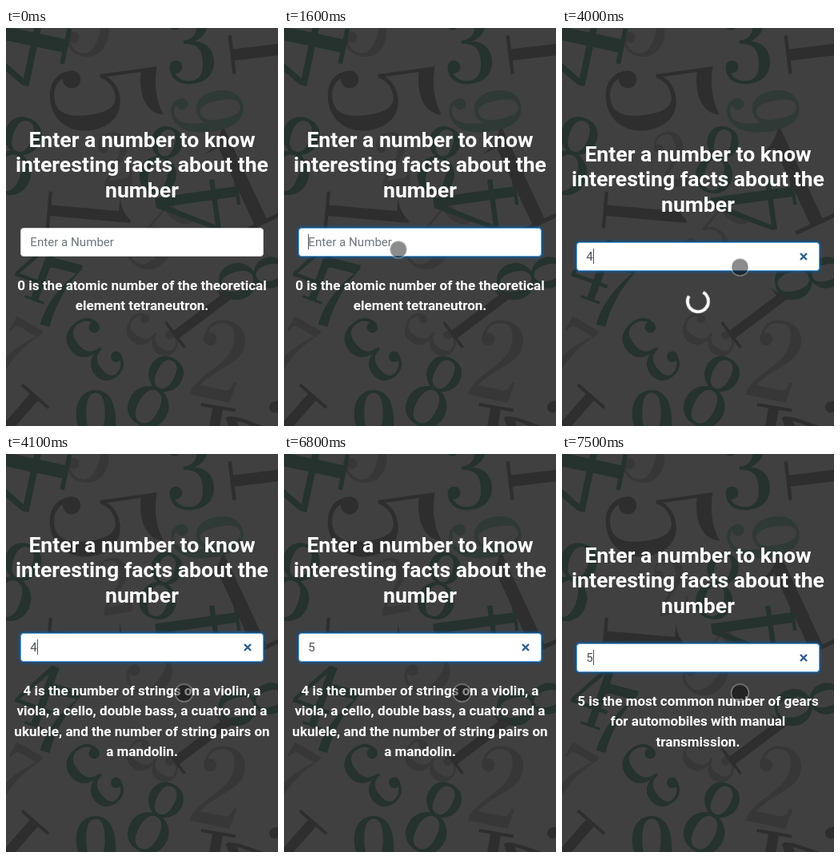
An HTML page that plays this animation: 340 px wide and 498 px high, repeating every 8000 ms.

```html
<!DOCTYPE html>
<html lang="en">
<head>
<meta charset="utf-8">
<title>Number facts</title>
<style>
  html, body { margin: 0; width: 100%; height: 100%; overflow: hidden; background: #404040; }
  #stage {
    position: relative; width: 340px; height: 498px; overflow: hidden;
    font-family: Roboto, sans-serif; color: #fff; text-align: center; white-space: nowrap;
  }
  #stage * { box-sizing: border-box; }
  #stage div, #stage svg { position: absolute; }

  #digits { inset: 0; fill-rule: evenodd; }
  .dark { fill: #2d2e2d; }
  .green { fill: #25322e; }
  .grey { fill: #373737; }
  .moss { fill: #2f3936; }

  .timed, .timed * { animation: 8s step-end infinite; }
  #panel { inset: 0; animation-name: shift; }
  #title { top: 124.5px; width: 340px; font-size: 26.64px; font-weight: 700; line-height: 31.6px; }
  .fact { top: 309.5px; width: 340px; font-size: 17.07px; font-weight: 700; line-height: 25.5px; }
  #zero { animation-name: zero; }
  #four { animation-name: four; }
  #five { animation-name: five; }

  #field {
    left: 18px; top: 250px; width: 304px; height: 36px; border: 1px solid #ced4da;
    border-radius: 4px; background: #fff; animation-name: focus;
    font-size: 15.11px; line-height: 34px; color: #495057; text-align: left;
  }
  #field div { left: 11.3px; }
  #hint { color: #6c757d; animation-name: hint; }
  #key4 { animation-name: key4; }
  #key5 { animation-name: key5; }
  #clear { left: 277.5px; top: 12px; animation-name: clear; }
  #field #caret { left: 11px; top: 7px; width: 1px; height: 19px; background: #555; animation-name: caret, caretX; }

  #spinner {
    left: 155px; top: 309px; width: 30px; height: 30px; border: 4px solid #fff;
    border-right-color: transparent; border-radius: 50%; animation-name: loading, spin;
  }
  #touch {
    left: -11.5px; top: -11.5px; width: 23px; height: 23px; border-radius: 50%;
    border: 1.5px solid rgba(255, 255, 255, .45); background: rgba(0, 0, 0, .45);
    background-clip: padding-box; animation-name: touch;
  }

  @keyframes shift {
    0% { transform: none; }
    43.75%, 87.5% { transform: translateY(18px); }
    51.25% { transform: translateY(-26px); }
    93.75%, 100% { transform: translateY(-13px); }
  }
  @keyframes zero { 0% { opacity: 1; } 43.75%, 100% { opacity: 0; } }
  @keyframes four { 0%, 87.5%, 100% { opacity: 0; } 51.25% { opacity: 1; } }
  @keyframes five { 0% { opacity: 0; } 93.75%, 100% { opacity: 1; } }
  @keyframes hint { 0%, 63.75% { opacity: 1; } 35%, 76.25%, 100% { opacity: 0; } }
  @keyframes key4 { 0%, 63.75%, 100% { opacity: 0; } 35% { opacity: 1; } }
  @keyframes key5 { 0% { opacity: 0; } 76.25%, 100% { opacity: 1; } }
  @keyframes clear { 0%, 63.75% { opacity: 0; } 35%, 76.25%, 100% { opacity: 1; } }
  @keyframes focus {
    0% { border-color: #ced4da; box-shadow: none; }
    20%, 100% { border-color: #5aa5dc; box-shadow: 0 0 3px 2px rgba(20, 85, 145, .75); }
  }
  @keyframes caret {
    0%, 27.5%, 42.5%, 58.75%, 73.75%, 85% { opacity: 0; }
    20%, 32.5%, 48.75%, 66.25%, 76.25%, 91.25%, 100% { opacity: 1; }
  }
  @keyframes caretX { 0%, 63.75% { transform: none; } 35%, 76.25%, 100% { transform: translateX(9px); } }
  @keyframes loading { 0%, 51.25%, 93.75%, 100% { opacity: 0; } 43.75%, 87.5% { opacity: 1; } }
  @keyframes spin {
    0% { transform: rotate(0deg); }
    43.75% { transform: rotate(0deg); animation-timing-function: steps(6); }
    51.25% { transform: rotate(306deg); }
    87.5% { transform: rotate(0deg); animation-timing-function: steps(5); }
    93.75%, 100% { transform: rotate(255deg); }
  }
  @keyframes touch {
    0% { transform: translate(-40px, 415px); }
    6.25% { transform: translate(4px, 415px); animation-timing-function: steps(3); }
    10% { transform: translate(55px, 340px); animation-timing-function: steps(3); }
    13.75% { transform: translate(112px, 270px); animation-timing-function: steps(2); }
    16.25% { transform: translate(126.5px, 261px); }
    20% { transform: translate(142.5px, 276.5px); animation-timing-function: steps(2); }
    22.5% { transform: translate(201.5px, 296.5px); }
    25% { transform: translate(221.5px, 298px); }
    27.5%, 100% { transform: translate(222px, 298.5px); }
  }
</style>
</head>
<body>
<div id="stage">
  <svg id="digits" width="340" height="498"></svg>
  <div id="panel" class="timed">
    <div id="title">Enter a number to know<br>interesting facts about the<br>number</div>
    <div id="field">
      <div id="hint">Enter a Number</div>
      <div id="key4">4</div>
      <div id="key5">5</div>
      <svg id="clear" width="10" height="10"><path d="M1 1 9 9M9 1 1 9" stroke="#2a5d8d" stroke-width="2.4"/></svg>
      <div id="caret"></div>
    </div>
    <div id="zero" class="fact">0 is the atomic number of the theoretical<br>element tetraneutron.</div>
    <div id="four" class="fact">4 is the number of strings on a violin, a<br>viola, a cello, double bass, a cuatro and a<br>ukulele, and the number of string pairs on<br>a mandolin.</div>
    <div id="five" class="fact">5 is the most common number of gears<br>for automobiles with manual<br>transmission.</div>
    <div id="spinner"></div>
  </div>
  <div id="touch" class="timed"></div>
</div>
<script>
  // Didone numerals drawn in a 60 by 100 box
  const path = d => `<path d="${d}"/>`;
  const ball = (x, y) => `<circle cx="${x}" cy="${y}" r="8"/>`;
  const glyphs = {
    1: path('M8 15Q24 13 34 0H37V96H52V100H8V96H24V15Z'),
    2: path('M6 28C6 8 16 0 31 0C48 0 58 11 58 26C58 50 30 60 14 86H44C50 86 53 82 54 74H58L54 100H4V94C14 68 44 52 44 27C44 12 40 4 29 4C18 4 10 10 10 24Z') + ball(14, 27),
    3: path('M6 22C8 8 16 0 30 0C46 0 54 10 54 23C54 36 46 44 36 47C49 49 58 58 58 72C58 90 46 100 28 100C12 100 2 92 2 78H6C8 90 16 96 27 96C38 96 44 88 44 72C44 57 38 50 22 49V45C35 45 41 37 41 23C41 10 37 4 29 4C20 4 12 10 10 22Z') + ball(13, 23) + ball(10, 77),
    4: path('M38 0H50V67H62V73H50V96H60V100H28V96H38V73H2V67ZM38 14L8 67H38Z'),
    5: path('M10 0C26 5 42 5 54 0C52 12 40 17 28 17Q20 17 13 15V46C18 40 25 37 33 37C49 37 59 49 59 67C59 87 46 100 28 100C12 100 3 91 3 79H7C8 90 16 96 27 96C39 96 45 86 45 67C45 50 41 41 31 41C22 41 16 46 13 52H10Z') + ball(11, 78),
    7: path('M4 0H58V6C40 40 34 70 34 100H20C20 70 34 38 52 14H20C12 14 9 18 8 28H4Z'),
    8: path('M30 0C45 0 53 10 53 23C53 34 46 42 38 46C50 51 57 60 57 73C57 90 46 100 30 100C14 100 3 90 3 73C3 60 10 51 22 46C14 42 7 34 7 23C7 10 15 0 30 0Z'
      + 'M30 4C22 4 18 11 18 23C18 36 22 44 30 44C38 44 42 36 42 23C42 11 38 4 30 4Z'
      + 'M30 49C21 49 16 58 16 73C16 88 21 96 30 96C39 96 44 88 44 73C44 58 39 49 30 49Z'),
    9: path('M30 0C48 0 58 16 58 44C58 80 44 100 24 100C12 100 5 93 5 83H9C11 92 16 96 24 96C36 96 43 84 44 56C40 62 34 65 27 65C12 65 3 52 3 33C3 13 14 0 30 0Z'
      + 'M30 4C21 4 17 14 17 32C17 50 21 60 29 60C38 60 43 50 43 34C43 14 39 4 30 4Z') + ball(13, 83)
  };

  // digit, shade, centre x, centre y, height, rotation
  const numerals = [
    [5, 'grey', 108, -5, 85, 20],
    [2, 'grey', 135, 165, 70, -10],
    [5, 'grey', 190, 262, 90, 40],
    [3, 'grey', 183, 385, 68, 120],
    [7, 'grey', 12, 400, 70, 30],
    [2, 'grey', 266, 415, 100, 12],
    [9, 'moss', 252, 105, 90, 80],
    [4, 'green', 5, 28, 140, -78],
    [3, 'green', 230, 20, 100, -5],
    [8, 'green', 12, 160, 100, 20],
    [8, 'green', 195, 165, 85, 15],
    [4, 'green', 241, 226, 105, -98],
    [7, 'green', 62, 332, 85, 15],
    [4, 'green', 38, 300, 80, 20],
    [8, 'green', 308, 312, 85, 75],
    [3, 'green', 112, 403, 85, 140],
    [9, 'green', 112, 498, 90, 0],
    [8, 'green', 188, 455, 94, 28],
    [5, 'dark', 124, 85, 138, 82],
    [1, 'dark', 335, 27, 110, 83],
    [1, 'dark', 292, 188, 130, -25],
    [1, 'dark', 104, 232, 105, 95],
    [1, 'dark', 246, 358, 90, 53],
    [1, 'dark', 5, 497, 100, 221],
    [1, 'dark', 257, 522, 100, 190],
    [2, 'dark', 322, 494, 85, 70]
  ];
  document.getElementById('digits').innerHTML = numerals.map(([digit, shade, x, y, height, turn]) =>
    `<g class="${shade}" transform="translate(${x} ${y}) rotate(${turn}) scale(${height / 100}) translate(-30 -50)">${glyphs[digit]}</g>`
  ).join('');
</script>
</body>
</html>
```
